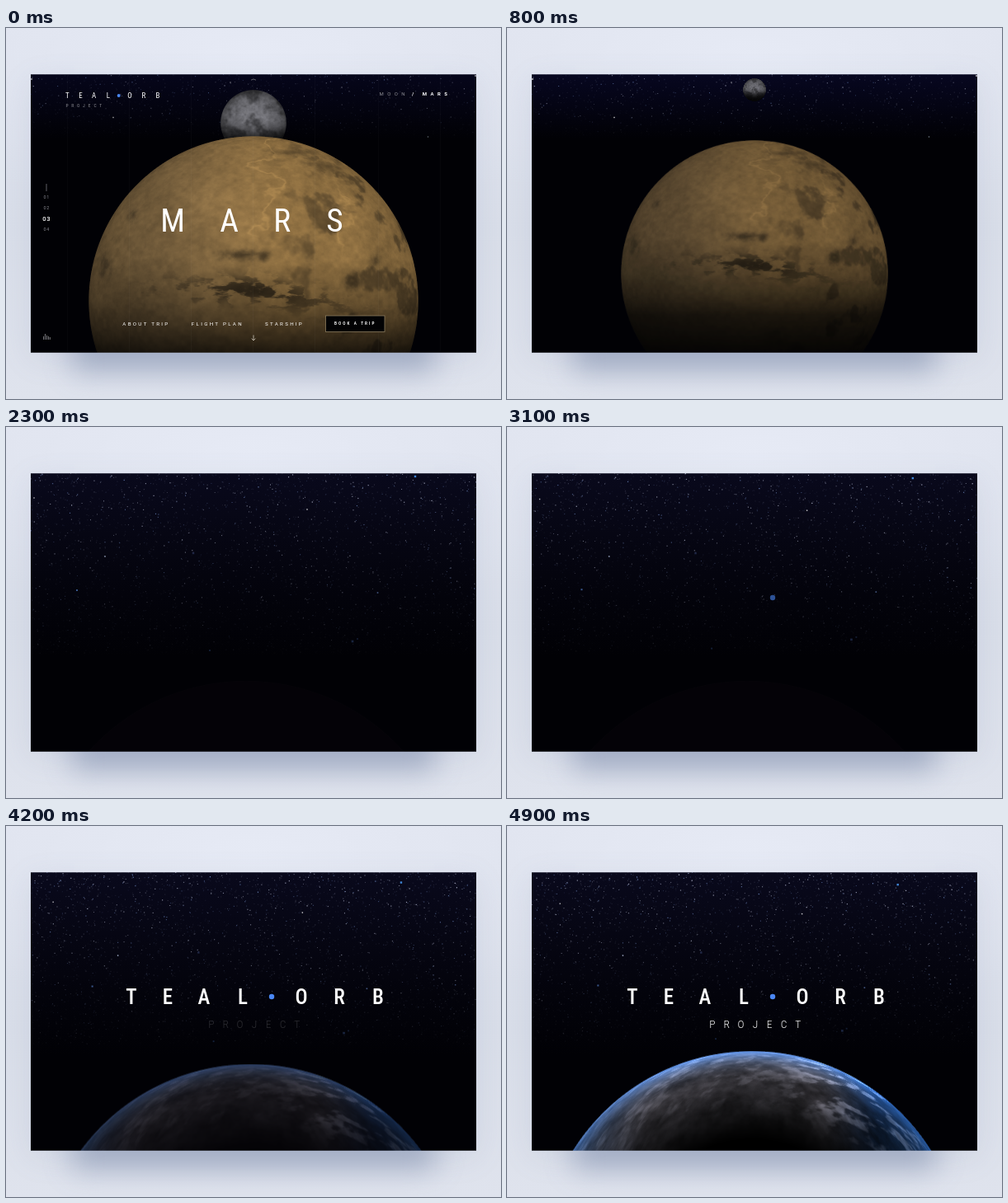
An HTML page with a canvas that plays this animation: 600x450 px, repeating every 5 s.

```html
<!DOCTYPE html>
<html lang="en">
<head>
<meta charset="utf-8">
<title>Planet trip</title>
<style>
  html, body { margin: 0; width: 100%; height: 100%; overflow: hidden; }
  body {
    position: relative;
    background: radial-gradient(ellipse 75% 45% at 50% 8%, #e6eaf5, rgba(230,234,245,0)),
                linear-gradient(#dfe3ee, #d9dee9 55%, #dfe3ed);
  }
  .glow, .shadow, canvas, svg { position: absolute; }
  .glow { left: 30px; top: 57px; width: 540px; height: 336px; box-shadow: 0 8px 34px rgba(120,134,168,.15); }
  .shadow { left: 80px; top: 368px; width: 440px; height: 48px; background: #8c99b5; filter: blur(17px); opacity: .72; }
  canvas, svg { left: 0; top: 0; width: 600px; height: 450px; }
  text { font-family: Roboto, "Liberation Sans", sans-serif; fill: #fff; }
  .narrow { font-family: "Roboto Condensed", Roboto, "Liberation Sans", sans-serif; font-stretch: condensed; text-anchor: middle; }
  .nav { font-size: 6.2px; letter-spacing: 2.3px; }
  .crumb { font-size: 6px; letter-spacing: 4.4px; }
  .page { font-size: 5.4px; letter-spacing: .8px; text-anchor: middle; fill: #85858c; }
  .line { stroke: #77777c; fill: none; }
</style>
</head>
<body>
<div class="glow"></div>
<div class="shadow"></div>
<canvas id="stage" width="600" height="450"></canvas>
<svg viewBox="0 0 600 450">
  <g id="ui">
    <path d="M74.5 57v336m75-336v336m75-336v336m75-336v336m75-336v336m77-336v336m75-336v336" stroke="#fff" stroke-opacity=".025"/>
    <path class="line" d="M297 63.2l3-1.2l3 1.2" stroke-width=".8"/>
    <g id="logo"></g>
    <text class="crumb" x="452.5" y="82.3" style="fill:#8e8e95">MOON</text>
    <text class="crumb" x="492" y="82.3" font-weight="700">/</text>
    <text class="crumb" x="504.8" y="82.3" font-weight="700">MARS</text>

    <path class="line" d="M49 189v9" stroke-width=".8"/>
    <text class="page" x="49.3" y="207.4">01</text>
    <text class="page" x="49.3" y="220">02</text>
    <text class="page" x="49.3" y="234.2" style="fill:#fff;font-size:7.6px;font-weight:500">03</text>
    <text class="page" x="49.3" y="246.3">04</text>
    <path class="line" d="M45.5 378v-4M47.5 378v-7M49.5 378v-5M51.5 378v-4M53.3 378v-3" stroke-width="1"/>

    <g id="heading"></g>

    <text class="nav" x="141.3" y="361.2">ABOUT TRIP</text>
    <text class="nav" x="224.8" y="361.2">FLIGHT PLAN</text>
    <text class="nav" x="314" y="361.2">STARSHIP</text>
    <rect x="387.5" y="349" width="71.5" height="19.5" fill="#020204" stroke="#8a7a5c" stroke-width=".8"/>
    <text x="398" y="360.3" font-size="4.6" font-weight="700" letter-spacing="2.1">BOOK A TRIP</text>
    <path d="M300 372.5v6.5m-2.4-2.4l2.4 2.4l2.4-2.4" fill="none" stroke="#cfc8ba" stroke-width=".8"/>
  </g>
  <g id="title"></g>
  <g id="sub"></g>
</svg>
<script>
const LOOP = 5000, STEP = 100;
const $ = id => document.getElementById(id);
const ctx = $('stage').getContext('2d');

const clamp = v => Math.min(1, Math.max(0, v));
const mix = (a, b, k) => a + (b - a) * k;
const ramp = (a, b, v) => clamp((v - a) / (b - a));
const smooth = (a, b, v) => { const k = ramp(a, b, v); return k * k * (3 - 2 * k); };
const sine = k => (1 - Math.cos(Math.PI * clamp(k))) / 2;
const bell = v => Math.exp(-v * v);

// Value of a track [[time, value], ...] at time t.
function at(t, track) {
  for (let i = 1; i < track.length; i++) {
    const [t0, v0] = track[i - 1], [t1, v1] = track[i];
    if (t <= t1) return mix(v0, v1, ramp(t0, t1, t));
  }
  return track[track.length - 1][1];
}

function random(seed) {
  return () => {
    seed = (seed + 0x6D2B79F5) | 0;
    let n = Math.imul(seed ^ seed >>> 15, 1 | seed);
    n = n + Math.imul(n ^ n >>> 7, 61 | n) ^ n;
    return ((n ^ n >>> 14) >>> 0) / 4294967296;
  };
}

const rand = random(11);
const lattice = Float32Array.from({ length: 65536 }, rand);
const cell = (x, y) => lattice[(x & 255) | (y & 255) << 8];

function noise(x, y) {
  const i = Math.floor(x), j = Math.floor(y);
  let u = x - i, v = y - j;
  u *= u * (3 - 2 * u);
  v *= v * (3 - 2 * v);
  return mix(mix(cell(i, j), cell(i + 1, j), u), mix(cell(i, j + 1), cell(i + 1, j + 1), u), v);
}

function fbm(x, y) {
  let sum = 0, amp = .53;
  for (let o = 0; o < 4; o++) {
    sum += amp * noise(x, y);
    x = x * 2.03 + 17;
    y = y * 2.03 + 31;
    amp /= 2;
  }
  return sum;
}

// Paints a ball; shade(x, y, z) gives its colour on the unit sphere.
function ball(radius, shade, depth = 1) {
  const size = radius * 2, c = document.createElement('canvas');
  c.width = c.height = size;
  const g = c.getContext('2d'), img = g.createImageData(size, size);
  for (let py = 0; py < size * depth; py++) {
    for (let px = 0; px < size; px++) {
      const x = (px + .5) / radius - 1, y = (py + .5) / radius - 1, d = Math.hypot(x, y);
      if (d > 1) continue;
      const rgb = shade(x, y, Math.sqrt(1 - d * d), d), o = (py * size + px) * 4;
      for (let k = 0; k < 3; k++) img.data[o + k] = rgb[k];
      img.data[o + 3] = 255 * clamp((1 - d) * radius + .2);
    }
  }
  g.putImageData(img, 0, 0);
  return c;
}

// Dark markings: x, y, half width, half height, strength
const spots = [
  [-.73, -.52, .03, .05, .35], [-.9, -.21, .025, .06, .35], [-.04, -.28, .13, .03, .5],
  [.6, -.12, .05, .045, .45], [.74, -.24, .03, .05, .4],
  [.24, -.9, .14, .02, .3], [.44, -.82, .1, .045, .3]
];
const fall = [[-1, 1], [-.25, .95], [0, .73], [.15, .5], [.31, .22], [.57, .06], [.7, 0]];

const mars = ball(200, (x, y, z) => {
  const u = x * (1.5 - .5 * z), v = y * (1.5 - .5 * z);
  const big = fbm(u * 3 + 5, v * 3 + 9), fine = fbm(u * 24 + 40, v * 26);
  let tone = .86 + (big - .5) * .18 + (fine - .5) * .2 - .1 * (y + .4);
  tone *= (.6 + .4 * Math.pow(z, .45)) * mix(1, .8, smooth(.1, -.9, x));
  const mid = -.07 + .17 * Math.max(0, x);
  const valley = bell((y - mid) / .085) * bell((x - .02) / .5);
  let dark = valley * smooth(.46, .64, fbm(u * 11, v * 24 + 60)) * .6;
  dark = Math.max(dark, smooth(-.1, .5, x) * smooth(.54, .72, fbm(u * 6 + 70, v * 6)) * .32);
  const rag = (fbm(u * 14 + 9, v * 14) - .5) * 4;
  for (const [sx, sy, rx, ry, a] of spots)
    dark = Math.max(dark, a * bell(Math.hypot((x - sx) / rx, (y - sy) / ry) + rag * .5));
  const bend = (fbm(u * 5, v * 7 + 20) - .5) * .35;
  const vein = smooth(-.3, -.45, y) * bell((x - .06 - bend + .12 * (y + .6)) / .016)
             + bell((y + .5) / .22) * bell((x - .55 - bend - .25 * (y + .5)) / .016);
  tone = (tone * (1 - dark) + vein * .11) * at(y, fall);
  const grey = smooth(.3, -.7, x) * .4 + dark * .5;
  return [mix(179, 160, grey) * tone, mix(140, 134, grey) * tone, mix(82, 98, grey) * tone];
});

const moon = ball(80, (x, y, z) => {
  const sea = smooth(.4, .62, fbm(x * 2.3 + 3, y * 2.3 + 6));
  const grain = (fbm(x * 12, y * 12) - .5) * 45;
  const tone = (mix(118, 74, sea) + grain) * (.45 + .55 * z) * mix(1, .06, smooth(-.2, .85, y));
  return [tone, tone, tone * 1.05];
});

const earth = ball(256, (x, y, z, d) => {
  const land = fbm(x * 9 + 3, z * 12 + 8), grain = fbm(x * 30, z * 34);
  const cloud = smooth(.5, .7, fbm(x * 14 + z * 5 + 20, z * 18 + x * 4)) * smooth(.62, .85, d);
  const sea = clamp(smooth(.3, .62, x) * .9 + smooth(-.45, -.85, x) * .5);
  const lit = Math.pow(ramp(.58, .95, d), 1.15) * (.35 + land * .7 + grain * .6);
  const side = 1 - .45 * smooth(.35, .85, Math.abs(x));
  const rim = Math.pow(ramp(.8, 1, d), 5) * side;
  const puff = cloud * mix(28, 80, smooth(.1, .4, x)) * lit * side;
  const blue = sea * side;
  return [
    mix(68, 10, sea) * lit + puff + rim * 42,
    mix(66, 30, sea) * lit + puff + rim * 100,
    mix(72, 50, sea) * lit + blue * 12 * lit + puff * 1.1 + rim * 185
  ];
}, .3);

function makeStars(count, bottom, seed, extra) {
  const r = random(seed), list = [];
  for (let i = 0; i < count; i++) {
    const x = -15 + 630 * r(), y = 30 + (bottom - 30) * Math.pow(r(), 1.2);
    const a = (.1 + .8 * Math.pow(r(), 4)) * (1 - .9 * ramp(56, bottom, y));
    list.push([x, y, a, .7 + .5 * r(), r() < .4 ? '#7f9fe0' : '#d5dbf2']);
  }
  return list.concat(extra);
}

const nearStars = makeStars(1700, 130, 5, [
  [31, 62, .9, 1.6, '#fff'], [569, 58, .9, 1.6, '#fff'], [130, 108.5, .8, 1.4, '#fff'],
  [511.5, 132, .6, 1.3, '#c8d8e8'], [272, 66, .7, 1.2, '#fff'], [407, 72, .6, 1.2, '#dde']
]);
const deepStars = makeStars(4200, 275, 23, [
  [496, 60, 1, 2.4, '#3f86d8'], [86, 198, .7, 2, '#4f78c0'], [450.5, 201, .6, 1.6, '#6f8fd0'],
  [420, 260, .4, 2.6, '#3a5590'], [426, 257, .3, 1.8, '#3a5590'], [120, 157, .8, 1.4, '#cfe0ff'],
  [247, 271, .4, 1.8, '#30508a'], [34, 86, .7, 1.4, '#fff'], [365, 100, .8, 1.4, '#fff'],
  [227, 153, .4, 2.4, '#40568f'], [568, 196, .5, 1.4, '#6f8fd0']
]);

function sky(stars, scale, alpha, bottom, colors) {
  if (alpha <= 0) return;
  ctx.globalAlpha = alpha;
  const g = ctx.createLinearGradient(0, 56, 0, bottom);
  colors.forEach((c, i) => g.addColorStop(i / (colors.length - 1), c));
  ctx.fillStyle = g;
  ctx.fillRect(30, 56, 540, bottom - 56);
  for (const [x, y, a, size, color] of stars) {
    ctx.globalAlpha = alpha * a;
    ctx.fillStyle = color;
    ctx.fillRect(300 + (x - 300) * scale - size / 2, 158 + (y - 158) * scale - size / 2, size, size);
  }
  ctx.globalAlpha = 1;
}

function put(img, x, y, r, alpha) {
  if (alpha <= 0) return;
  ctx.globalAlpha = alpha;
  ctx.drawImage(img, x - r, y - r, r * 2, r * 2);
  ctx.globalAlpha = 1;
}

// Text set letter by letter around the given centres
function add(parent, tag, attrs, label = '') {
  const el = document.createElementNS('http://www.w3.org/2000/svg', tag);
  for (const k in attrs) el.setAttribute(k, attrs[k]);
  el.textContent = label;
  return $(parent).appendChild(el);
}
const spread = (parent, word, xs, y, size, attrs = {}) => [...word].map((ch, i) =>
  add(parent, 'text', { class: 'narrow', x: xs[i], y, 'font-size': size, ...attrs }, ch));
const row = (start, gap) => Array.from({ length: 7 }, (_, i) => start + i * gap);

const NAME = 'TEALORB', BLUE = '#4a87f3';
const offsets = [-170, -126, -82, -35, 36, 82, 129];
const letters = spread('title', NAME, offsets.map(o => 322 + o), 215.8, 25, { 'font-weight': 500 });
const dot = add('title', 'circle', { cx: 322, cy: 207, r: 3.2, fill: BLUE });
spread('sub', 'PROJECT', row(249, 17.3), 245, 13.5, { 'font-weight': 300 });
spread('logo', NAME, offsets.map(o => 136.7 + o * .367), 85.4, 9);
add('logo', 'circle', { cx: 136.7, cy: 82, r: 2, fill: BLUE });
spread('logo', 'PROJECT', row(74, 6.8), 96.4, 5.6, { style: 'fill:#8b8b92' });
spread('heading', 'MARS', [202, 270.5, 334.8, 398.5], 247, 39.3);

const track = {
  ui: [[0, 1], [450, 0]],
  marsR: [[0, 200], [300, 198], [500, 193], [700, 178], [800, 162], [900, 118], [1000, 76.5], [1100, 48], [1200, 34]],
  marsTop: [[0, 131], [600, 134], [800, 136], [1000, 126.5], [1200, 122]],
  marsDim: [[0, 1], [400, .98], [800, .8], [1000, .52], [1200, 0]],
  moonR: [[0, 40], [200, 37], [400, 29], [600, 19.5], [800, 14], [1000, 10.3], [1600, 6]],
  moonY: [[0, 115], [200, 110], [400, 97], [600, 84], [800, 75], [1000, 66], [1600, 58]],
  moonDim: [[0, 1], [1100, .9], [1500, 0]],
  near: [[0, .8], [600, .8], [800, 1], [1200, .9], [1700, 0]],
  deep: [[1900, 0], [2300, 1]],
  earth: [[3700, 0], [4200, .4], [4900, 1]],
  dot: [[2950, 0], [3100, .6], [3300, 1]],
  sub: [[4100, 0], [4200, .17], [4700, 1]]
};

function draw(t) {
  const v = {};
  for (const k in track) v[k] = at(t, track[k]);

  ctx.clearRect(0, 0, 600, 450);
  ctx.globalAlpha = 1;
  ctx.fillStyle = '#010105';
  ctx.fillRect(30, 56.25, 540, 337.5);
  // Later layers only touch what the card already covers.
  ctx.globalCompositeOperation = 'source-atop';

  if (t < 1900) {
    sky(nearStars, 1, v.near, 134, ['#070720', '#040413', '#010105']);
    put(moon, 300, v.moonY, v.moonR, v.moonDim);
    put(mars, 300, v.marsTop + v.marsR, v.marsR, v.marsDim);
  } else {
    const scale = 1 - .116 * sine((t - 2300) / 2850);
    sky(deepStars, scale, v.deep, 280, ['#09091c', '#060613', '#03030b', '#010105']);
    const cy = 256 + mix(308, 272.5, sine((t - 3300) / 1700));
    const cx = mix(291, 297, sine((t - 3300) / 1000));
    ctx.globalAlpha = v.deep;
    ctx.fillStyle = '#040207';
    ctx.beginPath();
    ctx.arc(cx, cy, 256, 0, 7);
    ctx.fill();
    put(earth, cx, cy, 256, v.earth);
  }
  ctx.globalCompositeOperation = 'source-over';

  $('ui').style.opacity = v.ui;
  $('sub').style.opacity = v.sub;
  dot.style.opacity = v.dot;
  letters.forEach((el, i) => {
    const start = 3200 + 120 * (i < 4 ? 3 - i : i - 4);
    el.style.opacity = ramp(start, start + 400, t);
  });
}

let shown = -1;
const begin = performance.now();
function tick() {
  const t = Math.floor((performance.now() - begin) % LOOP / STEP) * STEP;
  if (t !== shown) draw(shown = t);
  requestAnimationFrame(tick);
}
tick();
</script>
</body>
</html>
```
